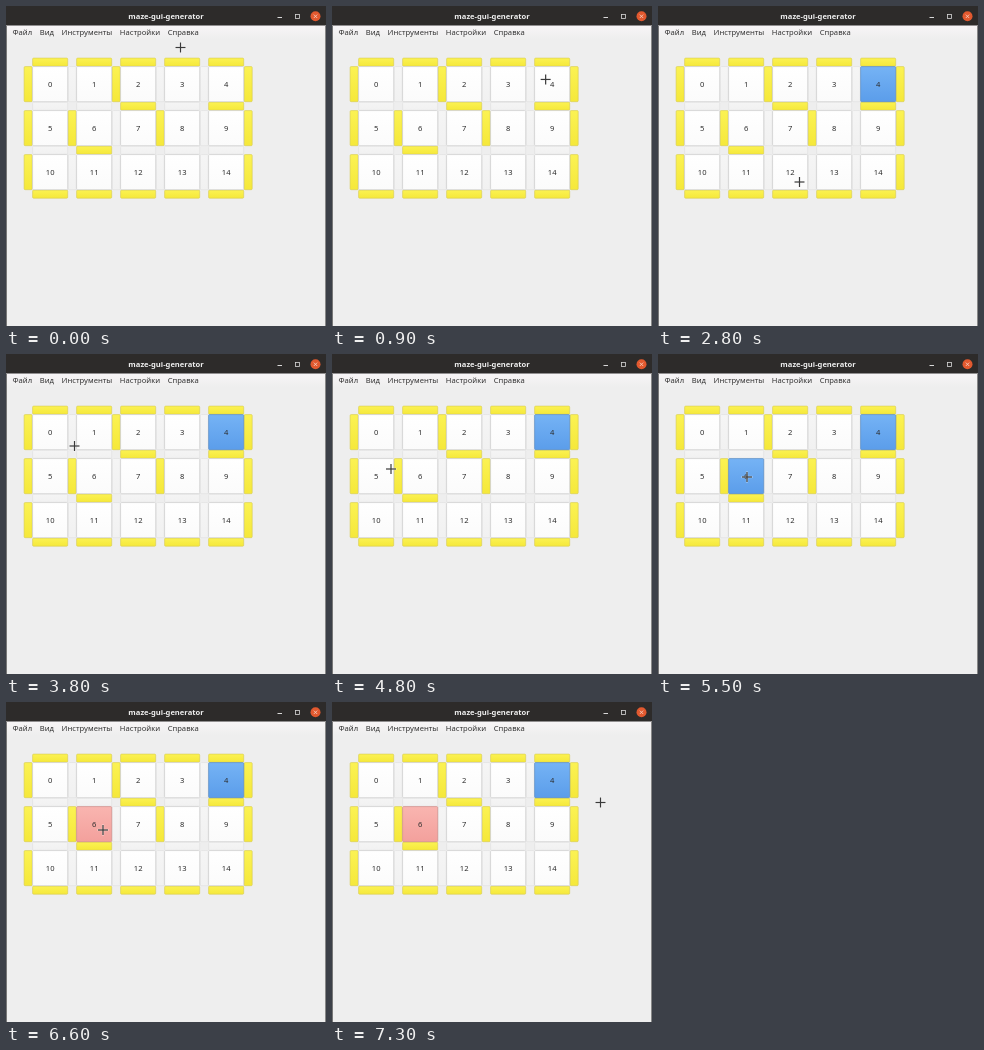
Recreate the animation shown at these times as an HTML page with a canvas. Size 320x320 px, loop 7600 ms.

```html
<!DOCTYPE html>
<html lang="ru">
<head>
<meta charset="utf-8">
<title>maze-gui-generator</title>
<style>
html, body { margin: 0; width: 100%; height: 100%; overflow: hidden; background: #efefef; }
canvas { display: block; width: 320px; height: 320px; }
</style>
</head>
<body>
<canvas id="stage"></canvas>
<script>
const canvas = document.getElementById('stage');
const ctx = canvas.getContext('2d');
const ratio = window.devicePixelRatio || 1;
canvas.width = canvas.height = 320 * ratio;

const LOOP = 7600, STEP = 100;
const COLS = 5, ROWS = 3, PITCH = 44, CELL = 35.5, WALL = PITCH - CELL;
const LEFT = 26.4, TOP = 60.4;
const FONT = '"Noto Sans", "Open Sans", sans-serif';

// inner walls as column,row of the cell they follow
const RIGHT_WALLS = ['1,0', '0,1', '2,1'];
const BOTTOM_WALLS = ['2,0', '4,0', '1,1'];
const MENU = ['Файл', 'Вид', 'Инструменты', 'Настройки', 'Справка'];

// pointer stops: arrival time, place, pause before moving on
const STOPS = [
  { at: 0, x: 174.5, y: 41.5, rest: 0 },
  { at: 1000, x: 218, y: 77, rest: 400 },
  { at: 1700, x: 251, y: 77, rest: 0 },
  { at: 2100, x: 270, y: 95, rest: 0 },
  { at: 2800, x: 141.5, y: 176, rest: 200 },
  { at: 3800, x: 68.5, y: 92, rest: 0 },
  { at: 4200, x: 51.5, y: 87.5, rest: 300 },
  { at: 4800, x: 59, y: 115, rest: 0 },
  { at: 5100, x: 89, y: 123, rest: 400 },
  { at: 6100, x: 97, y: 128, rest: 500 },
  { at: 7300, x: 268.5, y: 100.5, rest: 300 }
];

const BLUE = ['#75b3f5', '#5b9dea', '#5083bd'];
const RED = ['#f9b5b0', '#f3a09c', '#c98582'];
const WHITE = ['#ffffff', '#fbfbfb', '#c6c6c6'];
const YELLOW = ['#fbf253', '#f5e83a', '#d6c951'];
const EMPTY = ['#f5f5f5', '#f1f1f1', '#dddddd'];

function pointerAt(t) {
  const i = STOPS.findLastIndex(s => s.at <= t);
  const a = STOPS[i], b = STOPS[i + 1] || a;
  const start = a.at + a.rest;
  const k = t <= start ? 0 : (t - start) / (b.at - start);
  return [a.x + (b.x - a.x) * k, a.y + (b.y - a.y) * k];
}

function cellStyle(n, t) {
  if (n === 4 && t >= 1300) return BLUE;
  if (n === 6 && t >= 6500) return RED;
  if (n === 6 && t >= 5500) return BLUE;
  return WHITE;
}

function shade(y, h, from, to) {
  const fill = ctx.createLinearGradient(0, y, 0, y + h);
  fill.addColorStop(0, from);
  fill.addColorStop(1, to);
  return fill;
}

function button(x, y, w, h, [from, to, edge]) {
  ctx.beginPath();
  ctx.roundRect(x + 0.2, y + 0.2, w - 0.4, h - 0.4, 1);
  ctx.fillStyle = shade(y, h, from, to);
  ctx.fill();
  ctx.strokeStyle = edge;
  ctx.lineWidth = 0.6;
  ctx.stroke();
}

function text(str, x, y, color, align = 'left', weight = 500) {
  ctx.font = `${weight} 7.6px ${FONT}`;
  ctx.textAlign = align;
  ctx.fillStyle = color;
  ctx.fillText(str, x, y);
}

function line(x0, y0, x1, y1, color, width) {
  ctx.beginPath();
  ctx.moveTo(x0, y0);
  ctx.lineTo(x1, y1);
  ctx.strokeStyle = color;
  ctx.lineWidth = width;
  ctx.stroke();
}

function drawWindow() {
  ctx.fillStyle = '#eeeeee';
  ctx.fillRect(0, 0, 320, 320);
  ctx.fillStyle = shade(19, 14, '#f8f5f7', '#eeeeee');
  ctx.fillRect(0, 19, 320, 14);
  ctx.fillStyle = '#2d2b2a';
  ctx.fillRect(0, 0, 320, 19.5);
  text('maze-gui-generator', 160, 13, '#efefef', 'center', 700);

  line(271.5, 11.5, 276, 11.5, '#d8d8d8', 1);
  ctx.lineWidth = 0.8;
  ctx.strokeRect(289.5, 8.5, 4, 4);
  ctx.beginPath();
  ctx.arc(309.5, 10.3, 5, 0, Math.PI * 2);
  ctx.fillStyle = '#e2592f';
  ctx.fill();
  line(307.8, 8.6, 311.2, 12, '#f6d5c8', 0.8);
  line(311.2, 8.6, 307.8, 12, '#f6d5c8', 0.8);

  let x = 6.5;
  for (const label of MENU) {
    text(label, x, 29, '#333');
    x += ctx.measureText(label).width + 7.6;
  }
  line(0.5, 20, 0.5, 320, '#777', 1);
  line(319.5, 20, 319.5, 320, '#888', 1);
}

function drawMaze(t) {
  for (let r = -1; r < ROWS; r++) {
    for (let c = -1; c < COLS; c++) {
      const x = LEFT + c * PITCH, y = TOP + r * PITCH, key = c + ',' + r;
      if (r >= 0) {
        const solid = c < 0 || c === COLS - 1 || RIGHT_WALLS.includes(key);
        button(x + CELL, y, WALL, CELL, solid ? YELLOW : EMPTY);
      }
      if (c >= 0) {
        const solid = r < 0 || r === ROWS - 1 || BOTTOM_WALLS.includes(key);
        button(x, y + CELL, CELL, WALL, solid ? YELLOW : EMPTY);
      }
      if (r >= 0 && c >= 0) {
        const n = r * COLS + c;
        button(x, y, CELL, CELL, cellStyle(n, t));
        text(n, x + CELL / 2, y + 20.4, '#2d2d2d', 'center');
      }
    }
  }
}

function drawPointer([x, y]) {
  for (const [color, width, r] of [['rgba(255,255,255,0.5)', 2.2, 5.5], ['#3a3a3a', 1.2, 5]]) {
    line(x - r, y, x + r, y, color, width);
    line(x, y - r, x, y + r, color, width);
  }
}

function frame() {
  const t = Math.floor((performance.now() % LOOP) / STEP) * STEP;
  ctx.setTransform(ratio, 0, 0, ratio, 0, 0);
  drawWindow();
  drawMaze(t);
  drawPointer(pointerAt(t));
  requestAnimationFrame(frame);
}
frame();
</script>
</body>
</html>
```
